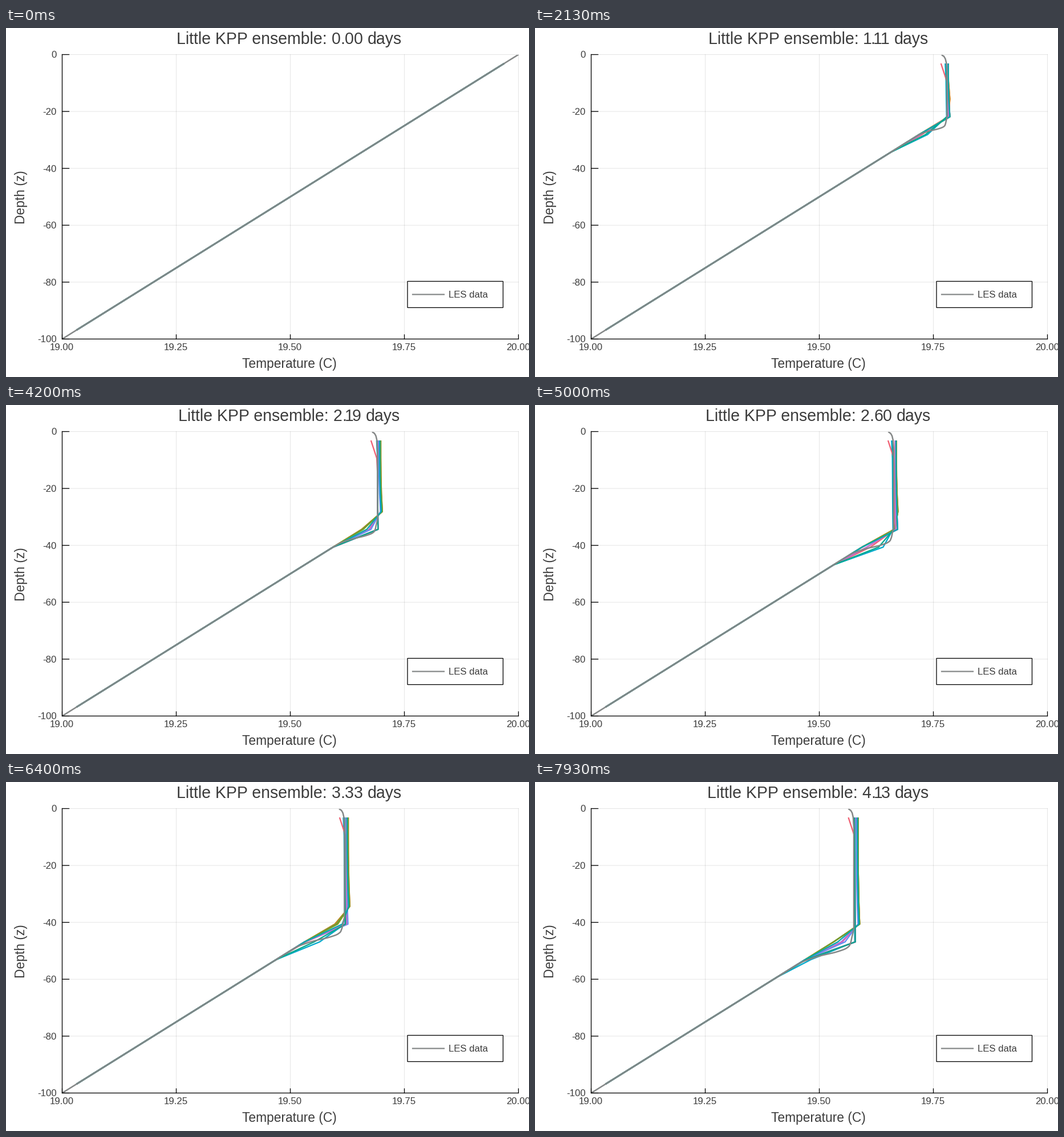
A matplotlib script that plays this animation: 917x611 px, repeating every 7990 ms.

```python
import numpy as np
import matplotlib.pyplot as plt
from matplotlib.animation import FuncAnimation
from matplotlib.patches import Rectangle

W, H, DPI = 917, 611, 128
FRAMES, LOOP = 120, 7990
LEFT, RIGHT, TOP, BOTTOM = 98.5, 898.5, 46.5, 544.5
GRAY, INK = "#848787", "#3c3c3c"
PT = 72 / DPI
TITLE, GUIDE, TICK = 28.5, 22.8, 16.7

plt.rcParams["font.family"] = "Liberation Sans"
fig = plt.figure(figsize=(W / DPI, H / DPI), dpi=DPI, facecolor="white")
ax = fig.add_axes([0, 0, 1, 1])
ax.set_xlim(0, W)
ax.set_ylim(H, 0)
ax.axis("off")


def px(temp):
    return LEFT + (RIGHT - LEFT) * (np.asarray(temp) - 19)


def py(z):
    return TOP - (BOTTOM - TOP) * np.asarray(z) / 100


def line(x, y, color="black", width=1.3, **kw):
    return ax.plot(x, y, color=color, lw=width * PT, snap=False, **kw)[0]


def label(x, y, s, size, ha="center", **kw):
    return ax.text(x, y, s, fontsize=size * PT, color=INK, ha=ha,
                   va="baseline", **kw)


# Grid, ticks and axes
for t in np.linspace(19, 20, 5):
    x = float(px(t))
    line([x, x], [TOP, BOTTOM], width=1, alpha=0.1, zorder=1)
    line([x, x], [BOTTOM, BOTTOM - 7.5], zorder=6)
    label(x - 0.5, 564.5, f"{t:.2f}", TICK)
for d in range(0, 101, 20):
    y = float(py(-d))
    line([LEFT, RIGHT], [y, y], width=1, alpha=0.1, zorder=1)
    line([LEFT, LEFT + 12], [y, y], zorder=6)
    label(89, y + 5.8, str(-d), TICK, ha="right")
line([LEFT, LEFT, RIGHT], [TOP, BOTTOM, BOTTOM], zorder=6)
label(497, 595.5, "Temperature (C)", GUIDE)
label(33, 296.5, "Depth (z)", GUIDE, rotation=90, rotation_mode="anchor")

# Legend
ax.add_patch(Rectangle((704, 443.5), 167.5, 46, fc="white", ec="black",
                       lw=1.3 * PT, snap=False, zorder=7))
line([713, 768], [466.5, 466.5], GRAY, 2.2, zorder=8)
label(776, 472.5, "LES data", TICK, ha="left", zorder=8)

# Title: fixed words around a kerned number
head = label(0, 28, "Little KPP ensemble:", TITLE, ha="left")
tail = label(0, 28, "days", TITLE, ha="left")
digits = [label(0, 28, "", TITLE, ha="left") for _ in range(4)]


def text_width(t):
    box = t.get_window_extent().transformed(ax.transData.inverted())
    return abs(box.width)


HEAD_W, TAIL_W = text_width(head), text_width(tail)
SPACE = 0.278 * TITLE


def set_title(days):
    num = f"{days:.2f}"
    steps = [0.278 if c == "." else 0.556 for c in num]
    for i in range(len(num) - 1):
        if "1" in num[i:i + 2]:
            steps[i] -= 0.11
    xs = np.concatenate([[0], np.cumsum(steps)]) * TITLE
    x = 496.5 - (HEAD_W + xs[-1] + TAIL_W + 2 * SPACE) / 2
    head.set_x(x)
    x += HEAD_W + SPACE
    for t, c, dx in zip(digits, num, xs):
        t.set_text(c)
        t.set_x(x + dx)
    tail.set_x(x + xs[-1] + SPACE)


# Coarse ensemble grid and members: colour, mixing depth factor, surface offset
ZC = -6.25 * (np.arange(16) + 0.5)
T0 = 20 + ZC / 100
MEMBERS = [
    ("#00a9cc", 1.18, -0.002),
    ("#ac8e18", 0.985, 0.0),
    ("#f06073", 1.135, -0.0145),
    ("#ed5e93", 1.12, 0.0),
    ("#9b7fe9", 1.055, 0.0),
    ("#8e971e", 1.01, 0.0),
    ("#c68225", 0.99, 0.0),
    ("#dd65b6", 1.06, 0.0),
    ("#618df6", 1.07, -0.001),
    ("#6c9f33", 1.0, 0.0),
    ("#c371d2", 1.12, 0.0),
    ("#00aaae", 1.04, 0.0),
    ("#00a98d", 1.165, -0.001),
]

# Normalised temperature drop across the entrainment zone
S = np.linspace(0, 2, 801)
KNOTS = [0, 1, 1.05, 1.1, 1.14, 1.165, 1.195, 1.215, 1.245, 1.27, 1.3, 2]
DROPS = [0, 0, 0.008, 0.014, 0.023, 0.045, 0.103, 0.165, 0.225, 0.268, 0.3, 1]
kernel = np.hanning(15)
DROP = np.convolve(np.interp(S, KNOTS, DROPS), kernel / kernel.sum(), "same")
Z = np.concatenate([np.linspace(0, -6, 31), np.linspace(-6.2, -100, 470)])


def layer_depth(n):
    return 3.89 * np.sqrt(n)


def les_profile(n):
    h = max(layer_depth(n), 1e-6)
    s = -Z / h
    drop = np.where(s > 1.5, s - 1, np.interp(s, S, DROP))
    skin = np.interp(-Z, [0, 0.3, 0.6, 1.5, 3, 6],
                     [0.0115, 0.0105, 0.007, 0.0037, 0.0015, 0])
    return 20 - h / 100 * (1 + drop) - skin * min(1, n / 3)


def member_profile(n, reach, offset):
    """Mix heat loss over the cells reached, conserving the total."""
    if n == 0:
        return T0
    w = np.clip(1 + (reach * layer_depth(n) + ZC) / 4, 0, 1) ** 1.5
    w[0] = 1
    mixed = (np.sum(w * T0) - 0.01155 * n) / w.sum()
    temp = T0 + w * (mixed - T0)
    k = int(np.sum(w == 1))
    grow = min(1, n / 4)
    temp[0] += offset * grow
    if k > 1:
        lift = 0.0035 if reach < 1.08 else 0.001
        temp[:k] += lift * (np.arange(k) / (k - 1)) ** 3
        temp[1] += 0.12 * offset * grow
    return temp


area = Rectangle((LEFT, TOP), RIGHT - LEFT, BOTTOM - TOP, transform=ax.transData)
style = dict(solid_joinstyle="round", solid_capstyle="butt")
curves = [line([], [], c, 2.3, zorder=3, **style) for c, _, _ in MEMBERS]
les = line([], [], GRAY, 2.5, zorder=4, **style)
for curve in curves + [les]:
    curve.set_clip_path(area)


def update(n):
    set_title(n / 28.8)
    for curve, (_, reach, offset) in zip(curves, MEMBERS):
        curve.set_data(px(member_profile(n, reach, offset)), py(ZC))
    les.set_data(px(les_profile(n)), py(Z))
    return [head, tail, les, *digits, *curves]


anim = FuncAnimation(fig, update, frames=FRAMES, interval=LOOP / FRAMES,
                     init_func=lambda: update(0), repeat=True, repeat_delay=0)
plt.show()
```
